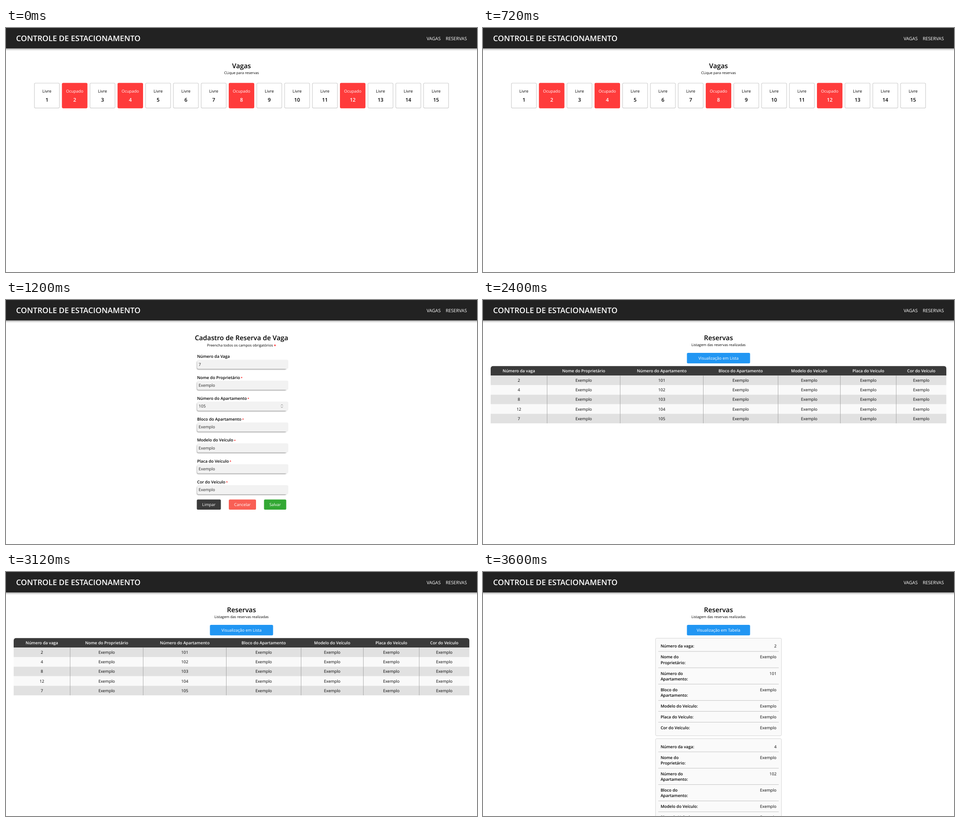
Animation of 1038 by 540 pixels, one loop 4800 ms. Source, as an HTML page:

```html
<!DOCTYPE html>
<html lang="pt">
<head>
<meta charset="utf-8">
<title>Controle de Estacionamento</title>
<style>
  html, body { margin: 0; width: 100%; height: 100%; overflow: hidden; background: #fff; }
  svg { display: block; width: 100vw; height: 100vh; font-family: "Open Sans", "Noto Sans", sans-serif; text-rendering: geometricPrecision; }
  .bar { filter: drop-shadow(0 1.2px 2.8px rgba(0, 0, 0, .6)); }
  .soft { filter: blur(1px); }
</style>
</head>
<body>
<svg id="stage" viewBox="0 0 1038 540"></svg>
<script>
const NS = "http://www.w3.org/2000/svg";
const stage = document.getElementById("stage");
const MID = 519;
const STEP = 1200;
const BODY = 9, SMALL = 7.87;

function add(parent, tag, attrs, content) {
  const el = document.createElementNS(NS, tag);
  for (const key in attrs) el.setAttribute(key, attrs[key]);
  if (content !== undefined) el.textContent = content;
  parent.appendChild(el);
  return el;
}

const box = (g, x, y, width, height, fill, rx = 0, more = {}) =>
  add(g, "rect", { x, y, width, height, fill, rx, ...more });

const line = (g, x1, y1, x2, y2, stroke) =>
  add(g, "line", { x1, y1, x2, y2, stroke, "stroke-width": 0.8 });

function text(g, content, x, y, { size = BODY, weight = 400, fill = "#000", anchor = "middle" } = {}) {
  return add(g, "text", { x, y, fill, "font-size": size, "font-weight": weight, "text-anchor": anchor }, content);
}

function star(el, size, dx, dy) {
  add(el, "tspan", { dx, dy, fill: "#f00", "font-size": size, "font-weight": 600 }, "*");
}

function button(g, label, x, y, width, height, fill) {
  box(g, x, y, width, height, fill, 2.5);
  text(g, label, x + width / 2, y + height / 2 + 3.3, { fill: "#fff" });
}

function heading(g, title, note, noteY = 102.3) {
  text(g, title, MID, 88.6, { size: 14.8, weight: 600 });
  return text(g, note, MID, noteY, { size: SMALL });
}

const owner = ["Nome do Proprietário", "Número do Apartamento", "Bloco do Apartamento",
  "Modelo do Veículo", "Placa do Veículo", "Cor do Veículo"];
const taken = [2, 4, 8, 12];
const valuesFor = (spot, i) => [spot, "Exemplo", 101 + i, "Exemplo", "Exemplo", "Exemplo", "Exemplo"];

function drawSpots(g) {
  heading(g, "Vagas", "CLique para reservas");
  for (let n = 1; n <= 15; n++) {
    const busy = taken.includes(n);
    const cx = MID + (n - 8) * 61.27;
    const fill = busy ? "#fff" : "#000";
    box(g, cx - 27.55, 122, 55.1, 55.1, busy ? "#ff3b3b" : "#fff", 2.3,
      { stroke: busy ? "#ff3b3b" : "#ccc", "stroke-width": 1.12 });
    text(g, busy ? "Ocupado" : "Livre", cx, 142.7, { fill });
    text(g, n, cx, 162.9, { size: 11.25, weight: 600, fill });
  }
}

function drawForm(g) {
  star(heading(g, "Cadastro de Reserva de Vaga", "Preencha todos os campos obrigatórios", 103.4), BODY, 2, 1.2);
  ["Número da Vaga", ...owner].forEach((name, i) => {
    const y = 132.2 + i * 46.25;
    const label = text(g, name, 421.2, y - 3.9, { weight: 600, anchor: "start" });
    if (i) star(label, 6.75, 1.6, 0.4);
    box(g, 420.8, y + 3, 197, 18.6, "#000", 3, { class: "soft", opacity: 0.45 });
    box(g, 421.2, y, 201, 20.3, "#f2f2f2", 3.4);
    text(g, i === 0 ? "7" : i === 2 ? "105" : "Exemplo", 424.6, y + 13.4, { fill: "#222", anchor: "start" });
  });
  add(g, "path", { d: "M605.6 233.4l2.4-2.2 2.4 2.2M605.6 236l2.4 2.2 2.4-2.2", fill: "none", stroke: "#888", "stroke-width": 1 });
  button(g, "Limpar", 420.5, 441.4, 53, 22.5, "#3a3a3a");
  button(g, "Cancelar", 491, 441.4, 60, 22.5, "#f95f55");
  button(g, "Salvar", 568.6, 441.4, 49, 22.5, "#33a834");
}

function drawReservations(g, mode) {
  heading(g, "Reservas", "Listagem das reservas realizadas");
  button(g, "Visualização em " + mode, 449.4, 117, 139.2, 23.2, "#2196f3");
}

function drawTable(g) {
  const edges = [16.9, 141.3, 302.3, 485.5, 650.3, 787.6, 910.7, 1021.1];
  const top = 167.3, rowH = 21.13, width = 1004.2;
  const center = c => (edges[c] + edges[c + 1]) / 2;
  drawReservations(g, "Lista");
  add(g, "path", { d: `M16.9 ${top}V151.8q0-5.6 5.6-5.6H1015.5q5.6 0 5.6 5.6V${top}z`, fill: "#3a3a3a" });
  ["Número da vaga", ...owner].forEach((name, c) =>
    text(g, name, center(c), 160.1, { weight: 600, fill: "#fff" }));
  [...taken, 7].forEach((spot, r) => {
    const y = top + r * rowH;
    box(g, edges[0], y, width, rowH, r % 2 ? "#f9f9f9" : "#e1e1e1");
    valuesFor(spot, r).forEach((v, c) => text(g, v, center(c), y + 13.9));
  });
  edges.slice(1, -1).forEach(x => line(g, x, top, x, top + 5 * rowH, "#999"));
}

function drawCard(g, top, values) {
  box(g, 380.2, top + 0.3, 277.6, 215.9, "#fafafa", 2.6, { stroke: "#ccc", "stroke-width": 0.8 });
  let y = top + 5.5;
  ["Número da vaga", ...owner].forEach((name, i) => {
    const split = i > 0 && i < 4;
    const words = name.split(" ");
    const rows = split ? [words.slice(0, 2).join(" "), words[2] + ":"] : [name + ":"];
    rows.forEach((part, k) =>
      text(g, part, 391.4, y + 15.6 + k * 12.3, { weight: 600, anchor: "start" }));
    text(g, values[i], 646.8, y + 15.6, { anchor: "end" });
    y += split ? 36.2 : 24.05;
    if (i < 6) line(g, 386.2, y, 651.8, y, "#b5b5b5");
  });
}

function drawList(g) {
  drawReservations(g, "Tabela");
  taken.slice(0, 2).forEach((spot, i) => drawCard(g, 146.2 + i * 222.3, valuesFor(spot, i)));
}

const scenes = [drawSpots, drawForm, drawTable, drawList].map(draw => {
  const g = add(stage, "g", {});
  draw(g);
  return g;
});

box(stage, -20, -20, 1078, 65, "#222", 0, { class: "bar" });
text(stage, "CONTROLE DE ESTACIONAMENTO", 22.3, 28.7, { size: 17.05, weight: 600, fill: "#fff", anchor: "start" });
text(stage, "VAGAS", 958, 26.8, { size: 10.12, fill: "#fff", anchor: "end" });
text(stage, "RESERVAS", 1015.8, 26.8, { size: 10.12, fill: "#fff", anchor: "end" });

const start = performance.now();
function render(now) {
  const current = Math.floor(Math.max(0, now - start) / STEP) % scenes.length;
  scenes.forEach((g, i) => g.setAttribute("display", i === current ? "inline" : "none"));
}
function tick(now) {
  render(now);
  requestAnimationFrame(tick);
}
render(start);
requestAnimationFrame(tick);
</script>
</body>
</html>
```
